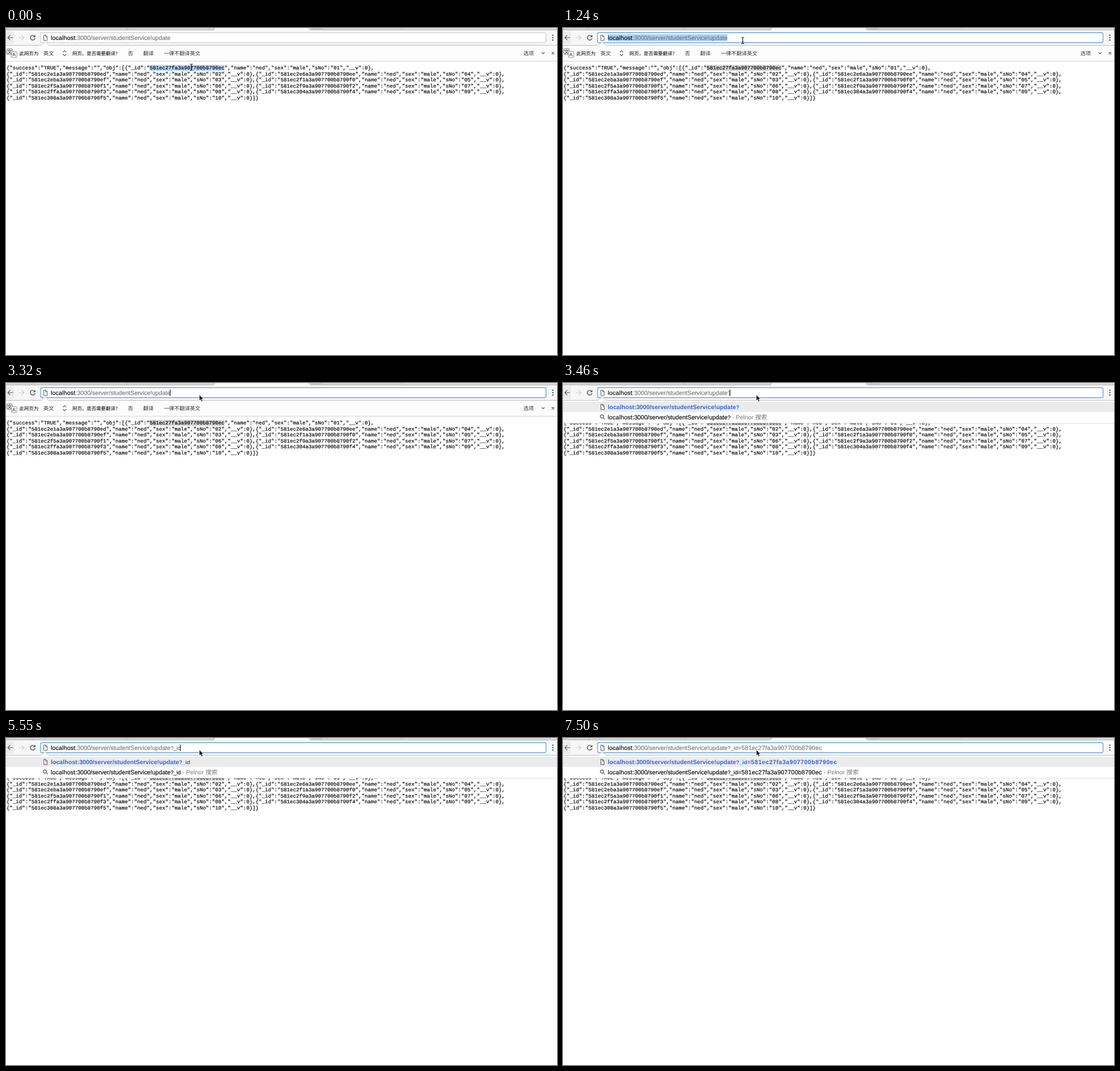
These frames come from a looping animation (972 px wide and 576 px high, 8 s). An HTML page:

```html
<!DOCTYPE html>
<html lang="zh">
<head>
<meta charset="utf-8">
<title>Address bar</title>
<style>
html, body { margin: 0; width: 100%; height: 100%; overflow: hidden; background: #fff; }
svg { display: block; }
text { text-rendering: geometricPrecision; white-space: pre; }
.ui { font: 10.69px "Liberation Sans", Arial, "Noto Sans CJK SC", sans-serif; }
.url { stroke-width: .2; }
.bold { font-size: 10.64px; font-weight: bold; stroke-width: 0; }
.cjk { font: 9.2px "Noto Sans CJK SC", "Noto Sans CJK", sans-serif; fill: #333; }
.note { font-size: 8.45px; font-weight: 500; fill: #000; }
.json { font: 9.167px "Liberation Mono", "Courier New", monospace; stroke: #000; stroke-width: .18; }
.host { letter-spacing: .14px; }
.path { letter-spacing: -.03px; }
.bold .host, .bold .path { letter-spacing: 0; }
.key { font-size: 9.6px; }
.val { letter-spacing: .15px; }
.bold .val { letter-spacing: .5px; }
.line { fill: none; stroke: #5a5a5a; stroke-width: 1.2; }
</style>
</head>
<body>
<svg width="972" height="576" viewBox="0 0 972 576">
  <defs>
    <path id="doc" class="line" style="stroke-width:1" d="M66.7 12.5H70l2.6 2.6V22h-5.900zM69.800 12.600v2.700h2.700"/>
  </defs>
  <rect width="972" height="576" fill="#fff"/>

  <g id="page">
    <rect id="mark" x="253.3" y="65" width="131.7" height="10.5"/>
  </g>

  <g id="infobar">
    <rect y="30" width="972" height="28.5" fill="#fcfcfc"/>
    <path d="M0 58.5H972" stroke="#d2d2d2"/>
    <rect x="1.5" y="36.5" width="9.5" height="10" rx="1" fill="#e4e4e4" stroke="#777" stroke-width=".8"/>
    <text class="cjk" x="2" y="45" style="font-size:8.5px">文</text>
    <rect x="9.5" y="41.5" width="9.5" height="10.5" rx="1" fill="#fff" stroke="#777" stroke-width=".8"/>
    <text class="ui" x="11" y="50.2" style="font-size:9px" fill="#333">A</text>
    <text class="cjk note" x="23.6" y="47.7">此网页为</text>
    <text class="cjk" x="66" y="47.8">英文</text>
    <path class="line" d="M100.5 42.7l2.8-2.8 2.8 2.8M100.5 46l2.8 2.8 2.8-2.8"/>
    <text class="cjk note" x="117" y="47.7">网页，是否需要翻译?</text>
    <text class="cjk" x="215" y="47.8">否</text>
    <text class="cjk" x="242" y="47.8">翻译</text>
    <text class="cjk" x="278.4" y="47.8">一律不翻译英文</text>
    <text class="cjk" x="912.8" y="47.8">选项</text>
    <path class="line" d="M945 43l2.5 2.5 2.5-2.5M962.7 42.2l4.4 4.4M967.1 42.2l-4.4 4.4"/>
  </g>

  <g id="toolbar">
    <rect width="972" height="30.5" fill="#f7f7f7"/>
    <rect width="972" height="3.5" fill="#d6d6d6"/>
    <rect x="703" width="269" height="3.5" fill="#dedede"/>
    <path d="M366 4l2.5-4H534l3 4z" fill="#f7f7f7"/>
    <path d="M0 3.5H366l2.5-3.5M534 0l3 3.5H972M45 3l2-3M213.5 3l2-3M538 0l2.5 1.5H556l2-1.5" fill="none" stroke="#b4b4b4"/>
    <path d="M0 30.5H972" stroke="#bcbcbc"/>
    <rect x="-4" y="6" width="18" height="22" rx="2" fill="#ececec"/>
    <path class="line" d="M12.5 17H3.5M7.5 12.7L3.2 17l4.3 4.3"/>
    <path class="line" style="stroke:#cfcfcf" d="M22.5 17h9M27.5 12.7l4.3 4.3-4.3 4.3"/>
    <path class="line" style="stroke-width:1.4" d="M50.3 14.3A4.2 4.2 0 1 0 51.2 18"/>
    <path d="M51.8 12v4.3h-4.3z" fill="#5a5a5a"/>
    <g fill="#5a5a5a">
      <circle cx="964.7" cy="12.7" r="1.3"/><circle cx="964.7" cy="17" r="1.3"/><circle cx="964.7" cy="21.3" r="1.3"/>
    </g>
    <rect id="box" x="61" y="8.2" width="891.6" height="17.6" rx="2.5" fill="#fff"/>
    <path d="M62 31l7-7 7 7z" fill="#fcfcfc"/>
    <path d="M62 30.5l7-6.5 7 6.5" fill="none" stroke="#c4c4c4"/>
    <use href="#doc"/>
    <rect id="sel" x="79" y="11" width="211" height="12" fill="#a8cff7"/>
  </g>

  <g id="drop">
    <rect y="31" width="972" height="39.5" fill="#fff"/>
    <rect y="33" width="972" height="18" fill="#ebebeb"/>
    <path d="M62 31h14l-2-1.5H64z" fill="#fff"/>
    <path d="M0 71H972" stroke="#d4d4d4" stroke-opacity=".8"/>
    <use href="#doc" y="25"/>
    <circle class="line" cx="68.7" cy="59" r="2.8"/>
    <path class="line" d="M70.8 61.2l3 3"/>
  </g>

  <path id="caret" d="M0 11.5V23" stroke="#000"/>
  <path id="beam" d="M-2.5-5.5Q0-5.5 0-4Q0-5.5 2.5-5.5M0-4V4M-2.5 5.5Q0 5.5 0 4Q0 5.5 2.5 5.5M-1.3 2H1.3" fill="none" stroke="#111" stroke-width="1.1"/>
  <path id="arrow" d="M0 0V10.3L2.4 8.1 4.2 12.2 6 11.4 4.2 7.4H7.4z" fill="#000" stroke="#fff" stroke-width=".8"/>
</svg>
<script>
const LOOP = 8000;
const HOST = 'localhost', PATH = ':3000/server/studentService!update';
const $ = id => document.getElementById(id);
const objectId = (mid, end) => `581ec${mid}a3a907700b8790${end}`;
const firstId = objectId('27f', 'ec');

function add(tag, parent, attrs, content = '') {
  const el = document.createElementNS('http://www.w3.org/2000/svg', tag);
  for (const k in attrs) el.setAttribute(k, attrs[k]);
  el.textContent = content;
  parent.appendChild(el);
  return el;
}

// JSON response: two records per line after the first
const records = ['27f ec 01', '2e1 ed 02', '2e6 ee 04', '2eb ef 03', '2f1 f0 05',
  '2f5 f1 06', '2f9 f2 07', '2ff f3 08', '304 f4 09', '308 f5 10'].map(r => {
  const [mid, end, no] = r.split(' ');
  return `{"_id":"${objectId(mid, end)}","name":"ned","sex":"male","sNo":"${no}","__v":0}`;
});
const lines = ['{"success":"TRUE","message":"","obj":[' + records[0] + ','];
for (let i = 1; i < 9; i += 2) lines.push(records[i] + ',' + records[i + 1] + ',');
lines.push(records[9] + ']}');
lines.forEach((s, i) => add('text', $('page'), { class: 'json', x: .8, y: 73 + i * 10.57 }, s));

function makeUrl(parent, y, cls, hostFill, pathFill) {
  const text = add('text', parent, { class: 'ui url ' + cls, x: 79, y });
  const part = (c, fill, s) => add('tspan', text, { class: c, fill, stroke: fill }, s);
  part('host', hostFill, HOST);
  part('path', pathFill, PATH);
  const key = part('key', pathFill), val = part('val', pathFill);
  return {
    text,
    set(query) {
      key.textContent = query.slice(0, 4);
      val.textContent = query.slice(4);
    }
  };
}
const bar = makeUrl($('toolbar'), 20.8, '', '#111', '#7c7c7c');
const match = makeUrl($('drop'), 45.9, 'bold', '#3367d6', '#3367d6');
const search = makeUrl($('drop'), 63.7, '', '#111', '#111');
const suffix = add('text', $('drop'), { class: 'ui', y: 63.7, fill: '#777' }, '- Pelnor 搜索');

// Step tracks: [start time, value]
const queries = [[0, ''], [3460, '?'], [5100, '?_'], [5400, '?_i'], [5550, '?_id'],
  [6600, '?_id='], [7050, '?_id=' + firstId]];
const carets = [[0, 0], [1840, 1], [2430, 0], [3020, 1], [4050, 0], [4500, 1], [6150, 0], [6600, 1], [7500, 0]];
const pointers = [[0, ['beam', 327, 69]], [500, ['none', 0, 0]], [650, ['arrow', 327, -4]],
  [800, ['beam', 317.5, 20]], [940, ['beam', 317, 22]], [1390, ['beam', 329, 22]],
  [1540, ['beam', 341.3, 22]], [3320, ['arrow', 341, 20.8]]];

const at = (track, t) => track.filter(step => step[0] <= t).pop()[1];
const show = (id, on) => $(id).setAttribute('visibility', on ? 'visible' : 'hidden');

function render(t) {
  const query = at(queries, t), focused = t >= 1240;
  [bar, match, search].forEach(u => u.set(query));
  $('mark').setAttribute('fill', focused ? '#d4d4d4' : '#b3d6fc');
  $('box').setAttribute('stroke', focused ? '#68a7e8' : '#c6c6c6');
  $('box').setAttribute('stroke-width', focused ? 1.4 : 1);
  show('sel', focused && t < 1840);
  show('drop', query);
  show('caret', at(carets, t));
  const end = 79 + bar.text.getComputedTextLength();
  $('caret').setAttribute('transform', `translate(${Math.floor(end) - .5} 0)`);
  suffix.setAttribute('x', end + 3);
  const [shape, x, y] = at(pointers, t);
  for (const id of ['beam', 'arrow']) {
    show(id, id === shape);
    $(id).setAttribute('transform', `translate(${x} ${y})`);
  }
}

const start = performance.now();
function tick() {
  render((performance.now() - start) % LOOP);
  requestAnimationFrame(tick);
}
tick();
</script>
</body>
</html>
```
